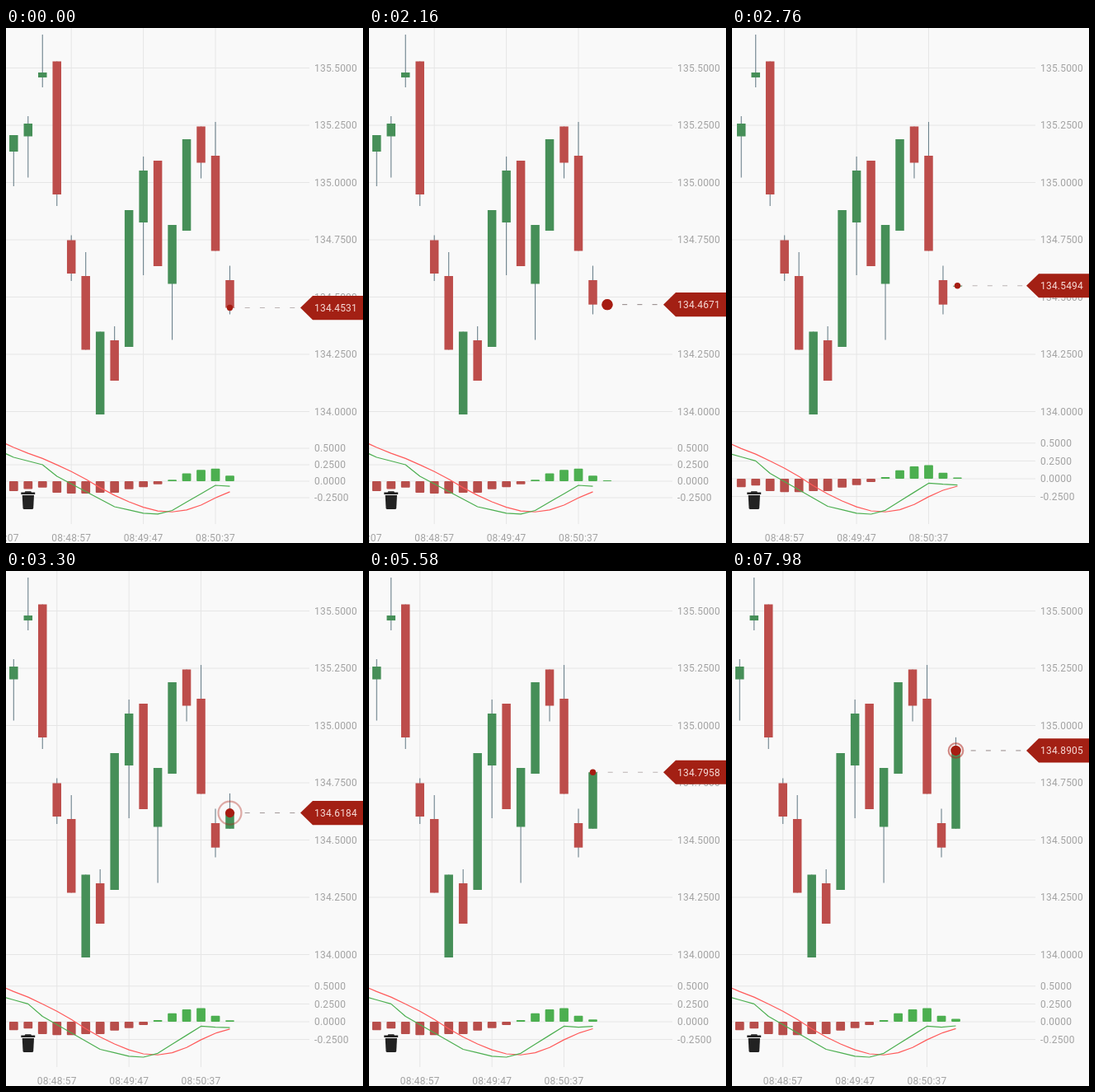
An HTML page for the animation above (8000 ms loop, 433 by 625 pixels).

```html
<!DOCTYPE html>
<html lang="en">
<head>
<meta charset="utf-8">
<title>Candlestick chart</title>
<style>
  html, body { margin: 0; width: 100%; height: 100%; overflow: hidden; background: #f9f9f9; }
  svg { display: block; width: 433px; height: 625px; }
  text { font: 12px Roboto, Arial, sans-serif; letter-spacing: .2px; fill: #a3a3a3; }
  .grid { stroke: #e6e6e6; stroke-width: 1; }
  .wick { stroke: #6d828d; stroke-width: 1.1; }
  .up { fill: #468f58; }
  .down { fill: #bd4d4b; }
  .bar-up { fill: #4caf50; }
  .bar-down { fill: #b84e4b; }
  .line { fill: none; stroke-width: 1.2; stroke-linejoin: round; }
  #macd { stroke: #4caf50; }
  #signal { stroke: #ff5a5a; }
  #dash { stroke: #7d6f6f; stroke-width: 1; stroke-dasharray: 6 12.2; }
  #ring { fill: none; stroke: #b0281e; stroke-width: 2.2; }
  #dot { fill: #a61c12; }
  #tag path { fill: #a32014; }
  #tag text { fill: #f6dad6; }
  .mid { text-anchor: middle; }
</style>
</head>
<body>
<svg viewBox="0 0 433 625">
  <g id="yGrid"></g>
  <g id="scroll">
    <g id="xGrid"></g>
    <line id="dash"/>
    <g id="candles"></g>
    <g id="bars"></g>
    <path id="signal" class="line"/>
    <path id="macd" class="line"/>
  </g>
  <g fill="#222">
    <path d="M18.3 563.6H22.6L23.4 562.2H30.2L31 563.6H35.2V566H18.3Z"/>
    <path d="M19.7 567H34L33.2 582.4Q33.1 584 31.5 584H22.2Q20.6 584 20.5 582.4Z"/>
  </g>
  <g id="labels"></g>
  <circle id="ring"/>
  <circle id="dot"/>
  <g id="tag"><path d="M357 0 372 -14.6H433V14.6H372Z"/><text x="374" y="4.4"></text></g>
</svg>
<script>
const LOOP = 8000, EASE_MS = 600, PULSE_MS = 400;
const X0 = 9.3, STEP = 17.48, LAST = 15, SHIFT_AT = 2161, SHIFT_MS = 900;
const SIGNAL_SPAN = 4, LEFT = -1;

// start time, price reached
const ticks = [
  [215, 134.4671], [SHIFT_AT, 134.5494], [3147, 134.7036], [4081, 134.7786],
  [5040, 134.796], [6000, 134.9485], [7020, 134.8784], [7921, 134.9421]
];
const FIRST = 134.4531, OPEN = ticks[1][1], RISE_AT = ticks[2][0];

// open, close, upper wick, lower wick
const candles = [
  [150, 130, 0, 42], [131.5, 116, 9, 50], [60, 54, 46, 12], [40.5, 202, 0, 14],
  [257.5, 298, 6, 9], [301, 390.5, 29], [469, 368.5], [379, 428, 17],
  [387, 221], [236, 173, 17, 64], [161, 289], [310.5, 239, 0, 68],
  [246, 135], [119.5, 163.5, 0, 19], [155, 270.5, 41], [306, 339, 17.5, 8.5]
];

// corners of the MACD line: candle index, offset below zero
const corners = [
  [-4, -61], [0, -29], [2, -20], [3, -6], [7, 31], [9, 38.8], [10, 39.8], [11, 35.5], [14, 5], [15, 6.2]
];

const $ = id => document.getElementById(id);
const set = (el, attrs) => { for (const k in attrs) el.setAttribute(k, attrs[k]); return el; };
const add = (parent, name, attrs, text) => {
  const el = set(document.createElementNS('http://www.w3.org/2000/svg', name), attrs);
  if (text) el.textContent = text;
  parent.appendChild(el);
  return el;
};
const clamp = v => Math.min(1, Math.max(0, v));
const easeOut = v => 1 - (1 - clamp(v)) ** 2;
const mix = (a, b, k) => a + (b - a) * k;
const priceY = v => 465.5 - (v - 134) * 278;
const xAt = i => X0 + STEP * i;

// the newest value follows the live price
function macdAt(i, price) {
  if (i > LAST) return 6.5 - 7 * (price - 134.62);
  const n = Math.max(1, corners.findIndex(([k]) => k >= i));
  const [[i0, v0], [i1, v1]] = corners.slice(n - 1, n + 1);
  return mix(v0, v1, (i - i0) / (i1 - i0));
}

// moving average of the MACD line
function signalAt(i, price) {
  let sum = 0;
  for (let k = 0; k < SIGNAL_SPAN; k++) sum += macdAt(i - k, price);
  return sum / SIGNAL_SPAN;
}

function addCandle(i, [open, close, above = 0, below = 0]) {
  const x = xAt(i), top = Math.min(open, close), bottom = Math.max(open, close);
  return {
    wick: add($('candles'), 'line', { class: 'wick', x1: x, x2: x, y1: top - above, y2: bottom + below }),
    body: add($('candles'), 'rect', {
      class: close > open ? 'down' : 'up', x: x - 5.25, y: top, width: 10.5, height: bottom - top
    })
  };
}

for (let i = 0; i < 7; i++) {
  const v = 134 + i * .25, y = priceY(v);
  add($('yGrid'), 'line', { class: 'grid', x1: 0, x2: 368, y1: y, y2: y });
  add($('labels'), 'text', { x: 374, y: y + 4.2 }, v.toFixed(4));
}
['08:48:07', '08:48:57', '08:49:47', '08:50:37'].forEach((s, i) => {
  const x = xAt(i * 5 - 1);
  add($('xGrid'), 'line', { class: 'grid', x1: x, x2: x, y1: 0, y2: 602 });
  add($('xGrid'), 'text', { class: 'mid', x, y: 622.6 }, s);
});
const levels = [.5, .25, 0, -.25].map(v => ({
  v,
  line: add($('yGrid'), 'line', { class: 'grid', x1: 0, x2: 368 }),
  text: add($('labels'), 'text', { x: 374 }, v.toFixed(4))
}));
const drawn = candles.map((c, i) => addCandle(i, c));
const live = addCandle(LAST + 1, [0, 0]);
const bars = Array.from({ length: LAST + 2 }, (_, i) =>
  add($('bars'), 'rect', { x: xAt(i) - 5.4, width: 10.8, rx: 1 }));

function readPrice(t) {
  let price = FIRST, prev = FIRST, age = Infinity, high = OPEN;
  for (const [start, goal] of ticks) {
    if (t < start) break;
    age = t - start;
    price = mix(prev, goal, easeOut(age / EASE_MS));
    prev = goal;
    high = Math.max(high, goal);
  }
  return { price, age, high };
}

function drawMacd(price, grow, shown) {
  const zero = mix(550, 547, grow), scale = mix(1, 1.08, grow);
  const y = v => zero + v * scale;
  for (const { v, line, text } of levels) {
    const ly = y(-v * 80);
    set(line, { y1: ly, y2: ly });
    text.setAttribute('y', ly + 4.2);
  }
  bars.forEach((bar, i) => {
    const h = (signalAt(i, price) - macdAt(i, price)) * scale;
    set(bar, { class: h > 0 ? 'bar-up' : 'bar-down', y: zero - Math.max(0, h), height: Math.abs(h) });
  });
  bars[LAST + 1].setAttribute('visibility', shown);

  const path = valueAt => {
    const points = [];
    for (let i = LEFT; i <= LAST; i++) points.push([xAt(i), y(valueAt(i, price))]);
    const tip = [xAt(LAST + 1), y(valueAt(LAST + 1, price))];
    points.push(points.at(-1).map((v, k) => mix(v, tip[k], grow)));
    return 'M' + points.join('L');
  };
  $('macd').setAttribute('d', path(macdAt));
  $('signal').setAttribute('d', path(signalAt));
}

function draw(t) {
  const { price, age, high } = readPrice(t);
  const on = t >= SHIFT_AT, rising = t >= RISE_AT, y = priceY(price);
  const shown = on ? 'visible' : 'hidden';
  const shift = STEP * easeOut((t - SHIFT_AT) / SHIFT_MS);
  const anchor = xAt(on ? LAST + 1 : LAST), x = anchor - shift;
  $('scroll').setAttribute('transform', `translate(${-shift} 0)`);

  const closeY = on ? priceY(ticks[0][1]) : y;
  drawn[LAST].body.setAttribute('height', closeY - candles[LAST][0]);

  const openY = rising ? priceY(OPEN) : y;
  set(live.body, { y, height: Math.max(1, openY - y), visibility: shown });
  set(live.wick, { y1: rising ? priceY(high) : y, y2: openY, visibility: shown });

  drawMacd(price, easeOut((t - SHIFT_AT) / EASE_MS), shown);

  const p = clamp(age / PULSE_MS);
  set($('dash'), { x1: anchor, x2: 360 + shift, y1: y, y2: y, opacity: mix(.85, .5, p) });
  set($('dot'), { cx: x, cy: y, r: mix(6.7, 3.7, p) });
  set($('ring'), { cx: x, cy: y, r: mix(5.5, 27.5, p), opacity: mix(.62, 0, p) });
  $('tag').setAttribute('transform', `translate(0 ${y})`);
  $('tag').lastChild.textContent = price.toFixed(4);
}

const begin = performance.now();
function frame() {
  draw((performance.now() - begin) % LOOP);
  requestAnimationFrame(frame);
}
draw(0);
requestAnimationFrame(frame);
</script>
</body>
</html>
```
